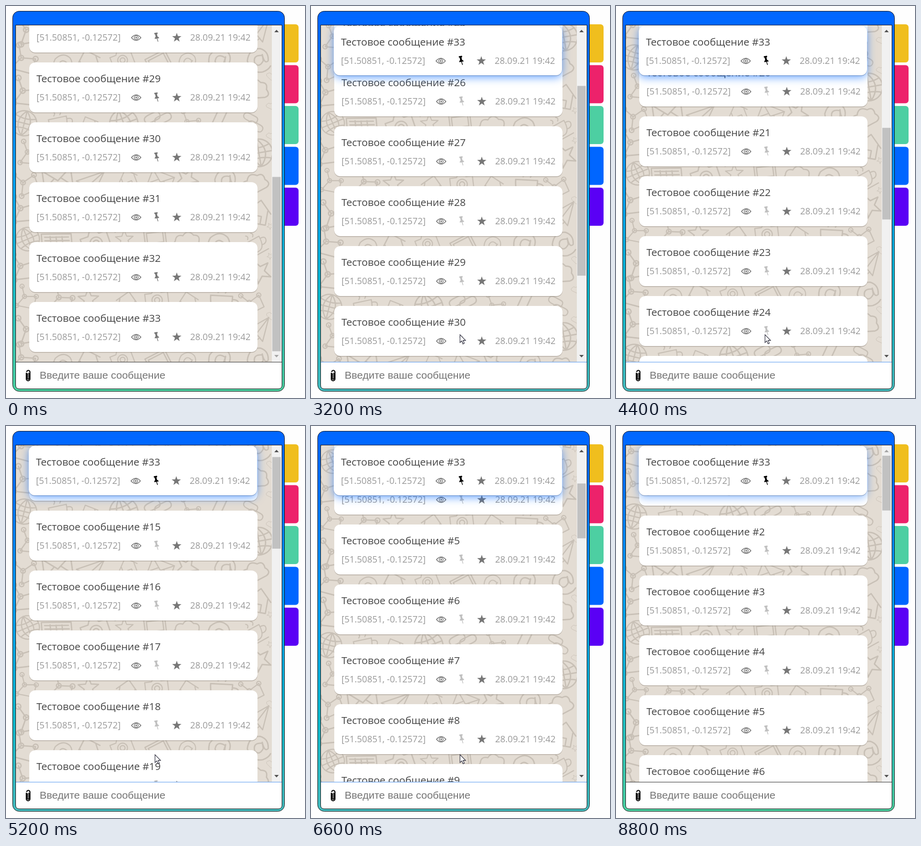
Write an HTML page that moves like this. It is 604 px wide and 792 px high and loops after 9 s.

```html
<!DOCTYPE html>
<html lang="ru">
<head>
<meta charset="utf-8">
<title>Чат</title>
<style>
html, body { margin: 0; width: 100%; height: 100%; overflow: hidden; background: #fefefe; }
svg { display: block; }
.title { font: 20.6px "Open Sans", "Noto Sans", sans-serif; fill: #444; }
.meta { font: 18px "Open Sans", "Noto Sans", sans-serif; fill: #999; }
.hint { font: 21px "Liberation Sans", Arial, sans-serif; fill: #757575; }
.icon { fill: #777; stroke: #777; }
.doodles { fill: none; stroke: #c8c0b6; stroke-width: 2.6; stroke-linecap: round; stroke-linejoin: round; }
</style>
</head>
<body>
<svg id="stage" width="604" height="792" viewBox="0 0 604 792">
  <defs>
    <linearGradient id="idle" x1="0" y1="0" x2="0" y2="1">
      <stop offset="0" stop-color="#0066ff"/><stop offset=".15" stop-color="#0074ff"/>
      <stop offset=".45" stop-color="#00a2f4"/><stop offset=".75" stop-color="#20bfc4"/>
      <stop offset="1" stop-color="#4dd0a0"/>
    </linearGradient>
    <linearGradient id="hover" x1="0" y1="0" x2="0" y2="1">
      <stop offset="0" stop-color="#0066ff"/><stop offset=".15" stop-color="#0072ff"/>
      <stop offset=".45" stop-color="#009cf4"/><stop offset=".75" stop-color="#0cb8cc"/>
      <stop offset="1" stop-color="#46bcbe"/>
    </linearGradient>
    <clipPath id="view"><rect x="20" y="39" width="517" height="680"/></clipPath>
    <g id="eye">
      <path d="M-9.5 0Q0-11 9.5 0Q0 11-9.5 0Z" fill="none" stroke-width="1.6"/>
      <circle r="4" fill="none" stroke-width="1.5"/><circle r="1.8" stroke="none"/>
    </g>
    <g id="pin">
      <path d="M-4.5-8.5L2-9.5L2.5-7L1-6.2L2-1.5Q5-.5 5.5 2L-3.5 3.5Q-4 1-1.7-.8L-2.7-5.6L-4.2-6Z" stroke="none"/>
      <path d="M1 2.5L3.2 9" stroke-width="1.3"/>
    </g>
  </defs>

  <g id="tabs"></g>
  <rect id="frame" x="13.5" y="10.5" width="549" height="768" rx="13" stroke="#111"/>
  <path d="M19.5 38.5H557.5V766Q557.5 773.5 550 773.5H27Q19.5 773.5 19.5 766Z" fill="#fff" stroke="#111"/>

  <g clip-path="url(#view)">
    <rect x="20" y="39" width="517" height="680" fill="#e3dcd3"/>
    <g id="paper" class="doodles"></g>
    <g id="list"></g>
  </g>

  <rect x="537" y="39" width="20" height="680" fill="#f1f1f1"/>
  <rect id="thumb" x="538" width="17" fill="#c1c1c1"/>
  <path id="up" d="M542 53L546.500 48L551 53Z"/>
  <path id="down" d="M542 705L546.500 710L551 705Z"/>

  <g id="pinned"></g>

  <path id="line" d="M20 719.500H557"/>
  <path d="M41 741V753.500a3.700 3.700 0 0 0 7.400 0V739.500a3.300 3.300 0 0 0-6.600 0M43.200 742V752.500a1.600 1.600 0 0 0 3.200 0V741" fill="none" stroke="#000" stroke-width="2.100"/>
  <text class="hint" x="68" y="753">Введите ваше сообщение</text>
  <path id="caret" d="M68.500 735V759" stroke="#000"/>
  <path id="cursor" d="M0 0V16L3.700 12.600L6.200 18.500L8.800 17.400L6.300 11.600H11.300Z" fill="#fff" stroke="#223" stroke-width="1.100"/>
</svg>
<script>
const $ = id => document.getElementById(id);
const LOOP = 9000, STEP = 200, ROW = 121, TILE = 605;

// Side tabs
$('tabs').innerHTML = ['#f0be1e', '#ed226b', '#4dcfa2', '#0066ff', '#5a00f5']
  .map((c, i) => `<rect x="550" y="${37 + i * 82.5}" width="41" height="77" rx="6" fill="${c}"/>`).join('');

// Message cards
const star = Array.from({ length: 10 }, (_, i) => {
  const r = i % 2 ? 3.9 : 9.8, a = i * Math.PI / 5;
  return (r * Math.sin(a)).toFixed(2) + ',' + (-r * Math.cos(a)).toFixed(2);
}).join(' ');

const card = (n, h) => `
  <rect y="1.6" width="461" height="${h}" rx="12" fill="#756b60" fill-opacity=".4"/>
  <rect class="face" width="461" height="${h}" rx="12" fill="#fff"/>
  <text class="title" x="14.500" y="40">Тестовое сообщение #${n}</text>
  <text class="meta" x="14.500" y="76.500">[51.50851, -0.12572]</text>
  <g class="icon">
    <use href="#eye" x="216" y="71"/>
    <use href="#pin" class="tack" x="257" y="70"/>
    <polygon points="${star}" transform="translate(298 71)" stroke="none"/>
  </g>
  <text class="meta" x="325" y="76.500">28.09.21 19:42</text>`;

$('list').innerHTML = Array.from({ length: 33 }, (_, i) =>
  `<g transform="translate(47 ${(i - 28) * ROW})">${card(i + 1, 101)}</g>`).join('');
const last = $('list').lastElementChild;
const tacks = [...$('list').querySelectorAll('.tack')];

$('pinned').innerHTML = card(33, 100);
$('pinned').setAttribute('transform', 'translate(46 40)');
const top33 = $('pinned').querySelector('.tack');
top33.style.fill = top33.style.stroke = '#000';
const face = $('pinned').querySelector('.face');

// Wallpaper: doodles about 60 px wide, scattered over a repeating tile
const shapes = {
  globe: 'M-27 0a27 27 0 1 0 54 0a27 27 0 1 0-54 0M-27 0H27M0-27V27M0-27Q-26 0 0 27M0-27Q26 0 0 27M-22-14Q0-6 22-14M-22 14Q0 6 22 14',
  net: 'M-22-24L-6-4L20-16M-6-4L-14 24M20-16L26 14L-14 24M-27-24a5 5 0 1 0 10 0a5 5 0 1 0-10 0M-11-4a5 5 0 1 0 10 0a5 5 0 1 0-10 0M15-16a5 5 0 1 0 10 0a5 5 0 1 0-10 0M-19 24a5 5 0 1 0 10 0a5 5 0 1 0-10 0',
  smile: 'M-20 0a20 20 0 1 0 40 0a20 20 0 1 0-40 0M-11 3Q0 20 11 3ZM-7-8v4M7-8v4',
  keys: 'M-32-12L28-16L32 12L-28 17ZM-25-6L23-9M-24 1L25-2M-22 8L26 5M-14-8L-11 10M-2-8L1 9M10-9L13 8',
  house: 'M-24 0L0-24L24 0M-17-5V24H17V-5M-5 24V8H6V24',
  thumb: 'M-22 0H-8L4-22Q12-24 10-8H25Q30-4 24 0Q29 5 23 8Q26 14 19 16Q20 22 12 23H-8M-22-2H-10V26H-22Z',
  pencil: 'M-28 20L-22 4L16-28L28-16L-10 16ZM-22 4L-10 16M8-21L20-9',
  plane: 'M-30-6L30-24L4 26L-6 6ZM-6 6L30-24M-6 6L-12 22L0 16',
  cup: 'M-24-14H18Q18 18 0 18H-8Q-24 16-24-14M18-8Q34-8 28 4Q24 10 15 8M-30 24H24M-10-20Q-4-26-10-30M4-20Q10-26 4-30',
  laptop: 'M-22-22H22V10H-22ZM-17-17H17V5H-17ZM-22 10L-31 24H31L22 10M-6 18H8',
  mail: 'M-27-17H27V18H-27ZM-27-17L0 5L27-17M-27 18L-6 0M27 18L6 0',
  camera: 'M-26-14H-10L-5-22H8L12-14H27V20H-26ZM-11 3a12 12 0 1 0 24 0a12 12 0 1 0-24 0M-5 3a6 6 0 1 0 12 0a6 6 0 1 0-12 0',
  cloud: 'M-20 15Q-34 8-24-4Q-22-18-8-14Q2-28 14-14Q28-14 24 0Q32 12 20 15Z',
  star: 'M0-22L6-7L22-6L9 4L14 20L0 11L-14 20L-9 4L-22-6L-6-7Z',
  chain: 'M-26-6Q-26-14-14-14H0Q8-14 8-6T0 2H-14Q-26 2-26-6M-8 6Q-8-2 2-2H18Q28-2 28 6T18 14H2Q-8 14-8 6',
  at: 'M10-6Q-8-14-9 3Q-4 15 8 4L10-8Q8 12 17 7Q24-10 10-20Q-10-28-21-6Q-24 20 0 24Q12 24 18 18'
};
const names = Object.keys(shapes);
let seed = 41;
const rnd = () => (seed = (seed * 16807) % 2147483647) / 2147483647;

let art = '';
const doodle = (name, x, y, turn, size) => {
  art += `<path d="${shapes[name]}" transform="translate(${x.toFixed(1)} ${y.toFixed(1)}) rotate(${turn.toFixed()}) scale(${size.toFixed(2)})"/>`;
};
for (let r = 0; r < 10; r++) {
  for (let c = 0; c < 8; c++) {
    const name = c === 0 ? (r % 4 === 2 ? 'globe' : 'net') : names[Math.floor(rnd() * names.length)];
    doodle(name, 42 + c * 66 + (rnd() - .5) * 16, 20 + r * 60.5 + (rnd() - .5) * 16, (rnd() - .5) * 60, .78 + rnd() * .3);
    if (rnd() < .6) doodle(rnd() < .5 ? 'star' : 'cloud', 72 + c * 66, 49 + r * 60.5, rnd() * 60, .3);
  }
}
$('paper').innerHTML = `<g id="tile">${art}</g>` +
  [-1, 1, 2].map(k => `<use href="#tile" y="${k * TILE}"/>`).join('');

// Time and top edge of message 29
const path = [[0, 114], [1199, 114], [1200, 214], [2600, 214], [3600, 666], [4400, 1191],
  [5800, 2370], [6600, 3103], [7200, 3448], [LOOP, 3448]];
const along = t => {
  const i = path.findIndex((p, k) => k && t <= p[0]);
  const [t0, a] = path[i - 1], [t1, b] = path[i];
  return a + (b - a) * (t - t0) / (t1 - t0);
};

const show = (el, on) => { el.style.display = on ? '' : 'none'; };

function draw(t) {
  const pos = Math.round(along(t));
  const pinned = t >= 1200;
  const focus = pinned && t < 8400;
  const inside = t >= 200 && t < 8600;

  // Older messages load whenever the list reaches its top
  const first = pos < 665 ? 24 : pos < 1875 ? 14 : 1;
  const height = (33 - first) * ROW + (pinned ? 41 : 141);
  const scroll = 60 + (29 - first) * ROW - pos;
  const atTop = scroll <= 0, atEnd = scroll >= height - 682;

  $('list').setAttribute('transform', `translate(0 ${pos})`);
  $('paper').setAttribute('transform', `translate(0 ${39 - scroll % TILE})`);
  $('thumb').setAttribute('y', 60 + scroll / height * 637);
  $('thumb').setAttribute('height', 637 * 680 / height);
  $('up').setAttribute('fill', atTop ? '#a3a3a3' : '#505050');
  $('down').setAttribute('fill', atEnd ? '#a3a3a3' : '#505050');

  show(last, !pinned);
  show($('pinned'), pinned);
  for (const k of tacks) k.style.fill = k.style.stroke = pinned ? '#c0c0c0' : '';
  const glow = Math.min(1, Math.max(0, (t - 1000) / 1000)) * (t >= 8400 ? .48 : .6);
  face.style.filter = `drop-shadow(0 4px 9px rgba(0,102,255,${glow}))`;

  $('frame').setAttribute('fill', `url(#${t >= 400 && t < 8600 ? 'hover' : 'idle'})`);
  $('line').setAttribute('stroke', focus ? '#5b9bf0' : '#333');
  show($('caret'), focus && (t + 250) % 1200 < 600);
  show($('cursor'), inside);
  const [x, y] = t < 400 ? [318, 712] : t < 8400 ? [301, 664] : [352, 738];
  $('cursor').setAttribute('transform', `translate(${x} ${y})`);
}

const start = performance.now();
let shown = -1;
function tick() {
  const t = Math.floor((performance.now() - start) % LOOP / STEP) * STEP;
  if (t !== shown) draw(shown = t);
  requestAnimationFrame(tick);
}
tick();
</script>
</body>
</html>
```
